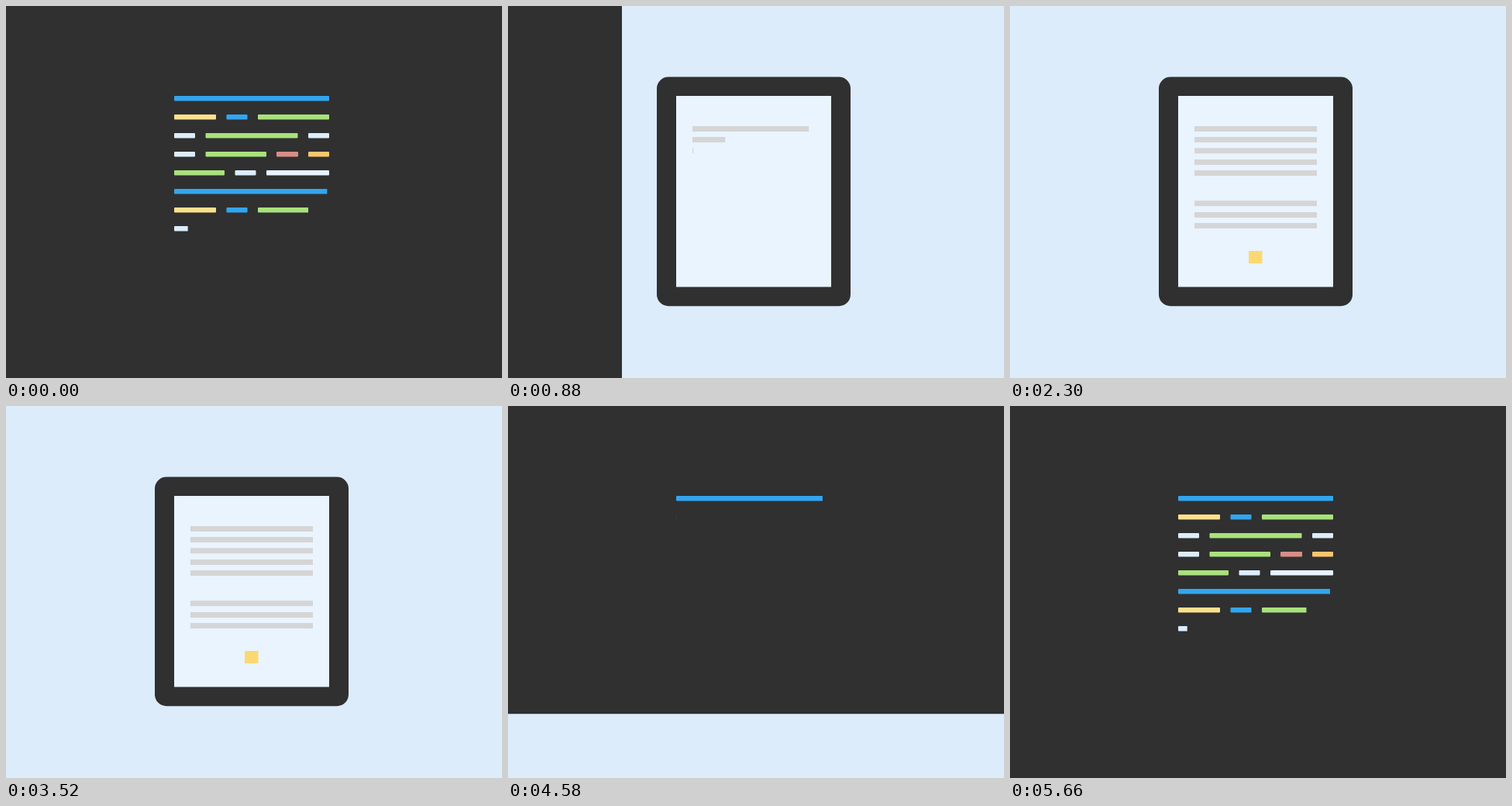
An HTML page with a canvas that plays this animation: 640x480 px, repeating every 5.68 s.

```html
<!DOCTYPE html>
<html lang="en">
<head>
<meta charset="utf-8">
<title>Code to tablet</title>
<style>
  html, body { margin: 0; width: 100%; height: 100%; overflow: hidden; background: #303030; }
  canvas { display: block; }
</style>
</head>
<body>
<canvas id="stage" width="640" height="480"></canvas>
<script>
const ctx = document.getElementById('stage').getContext('2d');
const W = 640, H = 480, LOOP = 5680, WIPE = 2160;

const DARK = '#303030', SKY = '#dcecfb', SCREEN = '#e9f4fe', GREY = '#d5d5d5', BADGE = '#fbd871';
const BLUE = '#33a5ee', YELLOW = '#fde08d', GREEN = '#a9e27c', ICE = '#dcedfc',
      PALE = '#e9f3fe', PINK = '#d98d87', ORANGE = '#fbc66b';

// Each code row is a list of [offset, width, colour]
const pattern = [
  [[0, 200, BLUE]],
  [[0, 54, YELLOW], [67.5, 27, BLUE], [108, 92, GREEN]],
  [[0, 27, ICE], [40.5, 119, GREEN], [173, 27, ICE]],
  [[0, 27, ICE], [40.5, 78.5, GREEN], [132, 28, PINK], [173, 27, ORANGE]],
  [[0, 65, GREEN], [78.5, 27, ICE], [119, 81, PALE]]
];
const codeRows = [...pattern, ...pattern];
const codeStart = i => i ? 4570 + 160 * (i - 1) : 4198;

const textY = [155, 169, 183.3, 197.9, 212, 251.3, 266, 280];
const textStart = i => i ? 671 + 153 * (i - 1) : 473;

// Cubic Bézier easing (0.7, 0, 0, 1)
function ease(u) {
  if (u <= 0) return 0;
  if (u >= 1) return 1;
  let lo = 0, hi = 1, s = 0.5;
  for (let i = 0; i < 24; i++) {
    const x = 2.1 * (1 - s) ** 2 * s + s ** 3;
    if (x < u) lo = s; else hi = s;
    s = (lo + hi) / 2;
  }
  return s * s * (3 - 2 * s);
}

function box(x, y, w, h, colour, radius = 0) {
  ctx.fillStyle = colour;
  ctx.beginPath();
  ctx.roundRect(x, y, w, h, radius);
  ctx.fill();
}

function clipTo(x, y, w, h) {
  ctx.beginPath();
  ctx.rect(x, y, w, h);
  ctx.clip();
}

function drawTablet(t) {
  box(0, 0, W, H, SKY);
  box(192, 91.5, 250, 295.7, DARK, 15);
  box(217, 116, 200, 246.5, SCREEN);
  textY.forEach((y, i) => box(238, y, 158 * ease((t - textStart(i)) / 600), 7, GREY));
  ctx.globalAlpha = ease((t - 1720) / 600);
  box(308, 316, 17.5, 16, BADGE);
  ctx.globalAlpha = 1;
}

function drawCode(t, w, h) {
  ctx.save();
  clipTo(0, 0, w, h);
  box(0, 0, w, h, DARK);
  codeRows.forEach((row, i) => {
    const y = 116 + 24 * i;
    ctx.save();
    clipTo(217, y - 1, 200 * ease((t - codeStart(i)) / 575), 9);
    for (const [x, width, colour] of row) box(217 + x, y, width, 6.5, colour, 1);
    ctx.restore();
  });
  ctx.restore();
}

function draw(t) {
  drawTablet(t);
  if (t < 2300) {
    const left = t < 20 ? 1 : 1 - ease((t + 128) / WIPE);
    drawCode(t + LOOP, W * left, H);
  } else {
    drawCode(t, W, H * ease((t - 3486) / WIPE));
  }
}

const start = performance.now();
function tick() {
  draw((performance.now() - start) % LOOP);
  requestAnimationFrame(tick);
}
tick();
</script>
</body>
</html>
```
